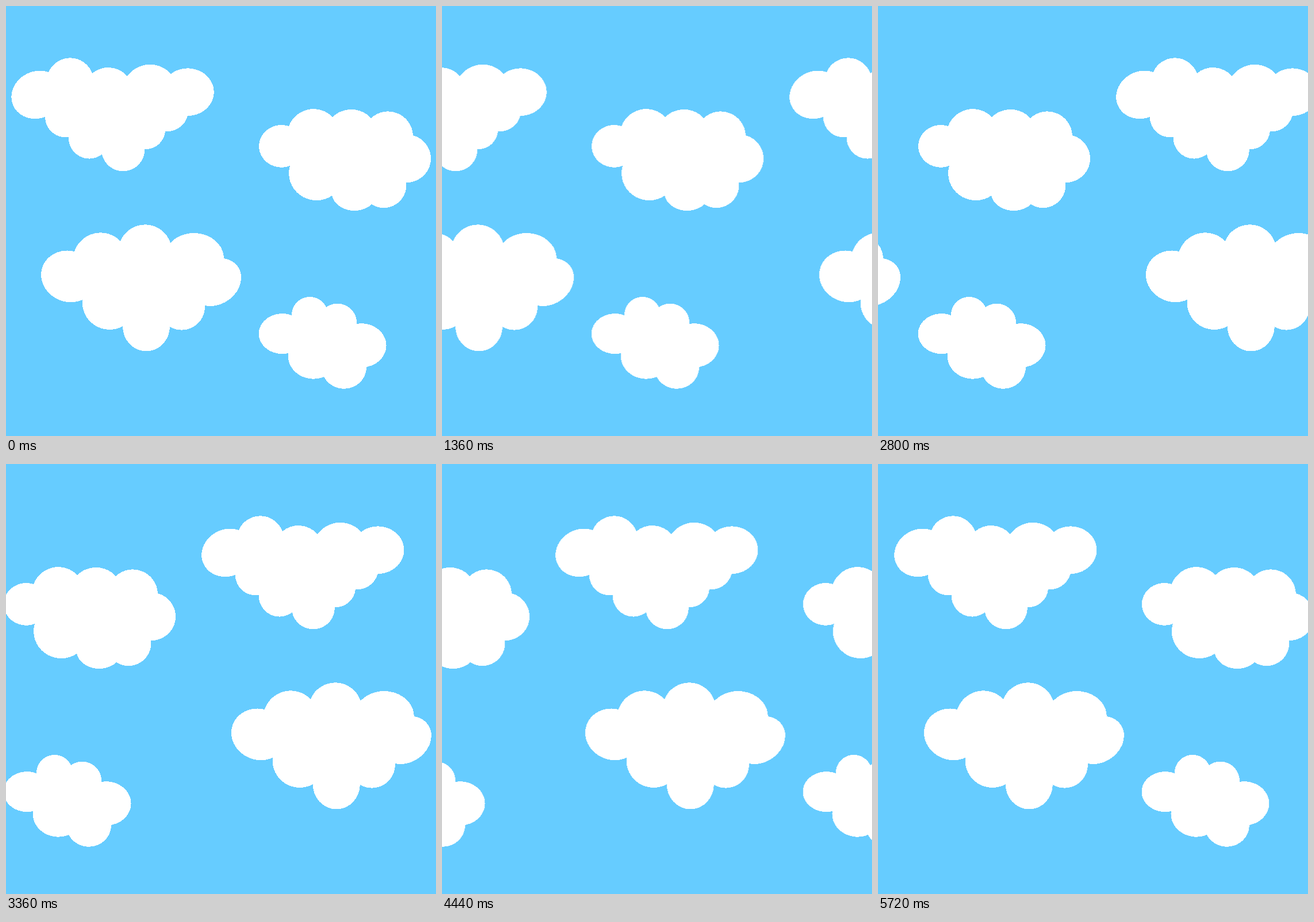
An HTML page that plays this animation: 748x748 px, repeating every 5.76 s.

```html
<!DOCTYPE html>
<html lang="en">
<head>
<meta charset="utf-8">
<title>Drifting clouds</title>
<style>
  html, body { margin: 0; width: 100%; height: 100%; overflow: hidden; background: #6cf; }
  svg { display: block; width: 100%; height: 100%; }
  .sky { fill: #fff; shape-rendering: crispEdges; animation: drift 5760ms steps(144) -2ms infinite; }
  /* the loop restarts with a small jump */
  @keyframes drift { to { transform: translateX(-761.2px); } }
</style>
</head>
<body>
<svg viewBox="0 0 748 748">
  <g class="sky">
    <path id="clouds"/>
    <use href="#clouds" x="774.8"/>
  </g>
</svg>
<script>
  // Each puff: end x, end y, rx, ry, tilt. A negative rx takes the longer way round.
  const wide = [
    [150, 117, 41], [211, 122, 44], [287, 118, 49], [316, 191, -45.5, 41.3],
    [277, 218, 37], [241, 249, 34], [167, 258, 37.4, 36.8], [109, 228, 36],
    [68, 193, 35.5], [74, 115, -46.2, 40.8, -25]
  ];
  const right = [
    [568, 193, 46], [635, 195, 47], [708, 225, 43.5], [696, 307, 41.7],
    [636, 345, 39.2], [567, 330, 40, 33], [494, 278, 48, 47], [492, 209, -39.3, 36.8]
  ];
  const left = [
    [199, 409, 48], [286, 412, 46.5], [379, 439, 52, 44], [346, 521, -47.7, 39, -33],
    [285, 558, 40.5], [203, 557, 41, 43], [133, 511, 47.3], [119, 427, -49, 44.3, 20]
  ];
  const small = [
    [557, 524, 31.5], [610, 553, 33.5], [627, 628, 42.8, 38],
    [553, 645, 39, 37], [491, 604, 44, 40], [497, 538, -41, 35]
  ];

  const arc = ([x, y, rx, ry = rx, tilt = 0]) =>
    `A${Math.abs(rx)} ${ry} ${tilt} ${rx < 0 ? 1 : 0} 1 ${x} ${y}`;

  const outline = puffs => {
    const [x, y] = puffs[puffs.length - 1];
    return `M${x} ${y}${puffs.map(arc).join("")}Z`;
  };

  document.getElementById("clouds")
    .setAttribute("d", [wide, right, left, small].map(outline).join(""));
</script>
</body>
</html>
```
